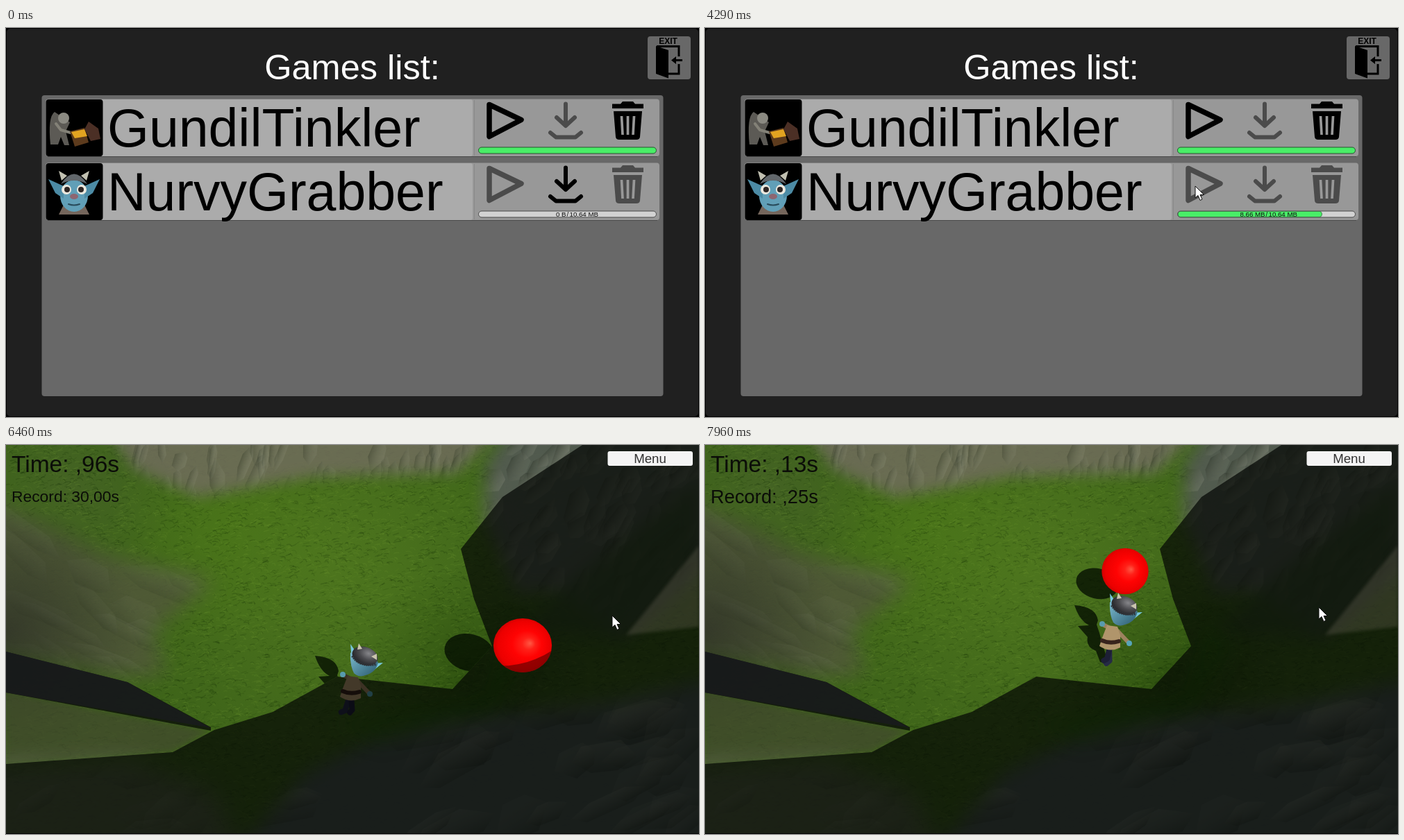
Animation, 998 px wide and 561 px high, one loop 8 s. Source, as an HTML page with a canvas:

```html
<!DOCTYPE html>
<html lang="en">
<head>
<meta charset="utf-8">
<title>Games list</title>
<style>
  html, body { margin: 0; width: 100%; height: 100%; overflow: hidden; background: #000; }
  canvas, svg { position: absolute; left: 0; top: 0; width: 998px; height: 561px; }
  text { font-family: "Liberation Sans", Arial, sans-serif; white-space: pre; }
  .line { fill: none; stroke: #000; stroke-linecap: round; stroke-linejoin: round; }
  .name { font-size: 77px; }
  .bytes { font-size: 9.7px; fill: #111; }
  .hud { fill: #0b0d08; }
</style>
</head>
<body>
<canvas id="ground" width="998" height="561"></canvas>
<svg viewBox="0 0 998 561">
  <defs>
    <g id="row">
      <rect x="57" y="102.500" width="884" height="82.500" rx="4" fill="#989898"/>
      <path d="M138 103H669Q672 103 672 106V182Q672 185 669 185H138Z" fill="#ababab"/>
      <path d="M674.500 104V184" stroke="#888"/>
      <path d="M60 185.500H938" stroke="#4a4a4a"/>
      <rect x="57.500" y="103" width="82" height="82" rx="4"/>
    </g>
    <path id="play" class="line" stroke-width="7.500" d="M696 110.500 742 132.500 696 156.500Z"/>
    <path id="load" class="line" stroke-width="6" d="M806 109.500V139M793 129 806 141 819 129M784 151 792 157.500H820L828 151"/>
    <g id="trash">
      <path d="M873 109.500H885L888 106H903L906 109.500H918V116H873ZM875 120H916L913 157Q912.500 161 908 161H883Q878.500 161 878 157Z"/>
      <path d="M886.500 127 888 154M895.500 127V154M904.500 127 903 154" stroke="#989898" stroke-width="3.700"/>
    </g>
    <rect id="bar" x="680.500" y="172" width="256" height="9" rx="4.500"/>
    <clipPath id="track"><use href="#bar"/></clipPath>
    <clipPath id="lit"><path id="litPath"/></clipPath>
    <clipPath id="ballClip"><ellipse id="ballEdge"/></clipPath>
    <radialGradient id="red" r=".56" fx=".63" fy=".46">
      <stop offset="0" stop-color="#ff5844"/><stop offset=".2" stop-color="#ff2018"/>
      <stop offset=".45" stop-color="#ff0303"/><stop offset=".8" stop-color="#ec0000"/><stop offset="1" stop-color="#bc0000"/>
    </radialGradient>
    <linearGradient id="skin" x2="1" y2="1">
      <stop offset="0" stop-color="#7fc0d4"/><stop offset="1" stop-color="#28566b"/>
    </linearGradient>
    <radialGradient id="iron" cx=".6" cy=".3" r=".7">
      <stop offset="0" stop-color="#86868a"/><stop offset=".5" stop-color="#4b4b4f"/><stop offset="1" stop-color="#232327"/>
    </radialGradient>
    <g id="halfImp">
      <path d="M-37-20-15-10-15 8-27 0Z" fill="#4c8ba5"/>
      <path d="M-18-18-22-32-10-25Z" fill="#c1c0b1"/>
      <circle cx="-11" cy="-5" r="7" fill="#ece9df"/>
      <circle cx="-10" cy="-5" r="4" fill="#2d2625"/>
    </g>
  </defs>

  <g id="menu">
    <rect width="998" height="561"/>
    <rect x="1" y="1" width="996" height="559" rx="5" fill="#202020"/>
    <text x="498.500" y="73.500" font-size="50.500" text-anchor="middle" fill="#fff">Games list:</text>
    <rect x="924" y="12" width="62" height="62" rx="4" fill="#686868"/>
    <text x="953.500" y="22.500" font-size="12" font-weight="bold" text-anchor="middle">EXIT</text>
    <path d="M936 26 954 32V72.500L936 66ZM958 46.500 965 41V52Z"/>
    <path d="M937 26.500H969V41M969 52V66H954M974 46.500H961" fill="none" stroke="#000" stroke-width="3"/>
    <rect x="51.500" y="97" width="895" height="434" rx="4" fill="#686868"/>

    <use href="#row"/>
    <path d="M70 121Q60 128 64 168H75L79 157 84 169H91L86 149 92 136Z" fill="#5c5a55"/>
    <circle cx="83" cy="130" r="8" fill="#8b8a82"/>
    <path d="M72 138 79 147 93 151" class="line" style="stroke:#838177" stroke-width="4"/>
    <path d="M92 149 113 144 119 165 99 171Z" fill="#5d3b1d"/>
    <path d="M94 150 113 146 117 156 99 159Z" fill="#e2a321"/>
    <path d="M113 146 119 135 133 145 136 160 122 163Z" fill="#4b2f25"/>
    <text class="name" x="146" y="170.500">GundilTinkler</text>
    <use href="#play"/><use href="#load" opacity=".5"/><use href="#trash"/>
    <use href="#bar" fill="#49ee67" stroke="#24532d"/>

    <use href="#row" y="92"/>
    <g transform="translate(98 238)">
      <path d="M-22 31-14 15H14L22 31Z" fill="#75665c"/>
      <ellipse cy="4" rx="20" ry="23" fill="#619fb7"/>
      <path d="M-19-13Q0-42 19-13 0-23-19-13Z" fill="#62676b"/>
      <use href="#halfImp"/><use href="#halfImp" transform="scale(-1 1)"/>
      <ellipse cy="5" rx="6" ry="4" fill="#8d6671"/>
      <path d="M-8 16Q0 19 8 16" class="line" style="stroke:#294b5b" stroke-width="2"/>
    </g>
    <text class="name" x="146" y="263">NurvyGrabber</text>
    <g transform="translate(0 92)">
      <use id="play2" href="#play"/><use id="load2" href="#load"/><use id="trash2" href="#trash"/>
      <use href="#bar" fill="#d2d2d2"/>
      <g clip-path="url(#track)"><rect id="fill" x="681" y="172" height="9" rx="4.500" fill="#49ee67" stroke="#24532d" stroke-width=".7"/></g>
      <use href="#bar" fill="none" stroke="#494949"/>
      <g id="bytes" class="bytes">
        <text id="got" x="806.500" y="179.700" text-anchor="end"></text>
        <text x="808.800" y="179.700" text-anchor="middle">/</text>
        <text x="811.500" y="179.700">10.64 MB</text>
      </g>
    </g>
  </g>

  <g id="game">
    <g clip-path="url(#lit)" fill="#030c00" fill-opacity=".77">
      <ellipse id="ballShade"/>
      <path id="idleShade" d="M435 320 446 322 451 315 475 317 477 340 462 342 444 331Z"/>
      <path id="runShade" d="M-71 0Q-40 2-37 22L-39 28-35 40-30 58-22 84-34 82-40 66Q-55 60-52 46L-66 30-50 29Q-64 22-71 0Z"/>
    </g>
    <ellipse id="ball" fill="url(#red)"/>
    <g clip-path="url(#ballClip)"><path id="ballDark" fill="#500" d="M-60 28Q10 38 60-6V60H-60Z"/></g>

    <g id="idle">
      <ellipse cx="484" cy="388" rx="8" ry="10" fill="#17172b"/>
      <ellipse cx="503" cy="390" rx="8" ry="10" fill="#17172b"/>
      <path d="M482 360 477 374M512 360 518 375" class="line" style="stroke:#363c3d" stroke-width="5"/>
      <path d="M487 348H509L517 368 513 382Q498 387 482 381L478 366Z" fill="#3c3023"/>
      <path d="M481 371Q498 376 515 370" class="line" style="stroke:#24100d" stroke-width="5"/>
      <path d="M472 320 486 326 485 339 477 335ZM537 324 522 326 522 340 530 335Z" fill="#8ed5df"/>
      <ellipse cx="504" cy="335" rx="21" ry="15" fill="#639cac"/>
      <ellipse cx="505" cy="330" rx="21" ry="15" fill="url(#iron)"/>
      <path d="M484 334Q505 356 526 333" fill="none" stroke="#4b5055" stroke-width="4" stroke-dasharray="2 1"/>
      <path d="M488 327 486 318 495 325ZM518 325 522 317 525 328Z" fill="#c0baa2"/>
    </g>

    <g id="run">
      <g id="body">
        <path id="legA" class="line" style="stroke:#22263f" stroke-width="8" d="M-21 58-24 80-29 83"/>
        <path id="legB" class="line" style="stroke:#1a1c31" stroke-width="8" d="M-19 58-21 78-25 81"/>
        <path d="M-22 32-32 27M-10 36 7 54" class="line" style="stroke:#8f7656" stroke-width="6"/>
        <path d="M-24 29-9 31-5 43-5 61Q-20 69-35 59L-31 47Z" fill="#a08761"/>
        <path d="M-31 51Q-20 56-7 52" class="line" style="stroke:#322019" stroke-width="6"/>
        <circle cx="8" cy="55" r="4" fill="#4f95a7"/>
      </g>
      <circle cx="-31" cy="27" r="4" fill="#589bad"/>
      <path d="M-20-17-13-7-18 7ZM27 10 12 11 12 22Z" fill="#77c7dc"/>
      <path d="M-20-4Q-16-10 0-6L20 9Q17 24 2 28-8 32-15 25-21 13-20-4Z" fill="url(#skin)"/>
      <ellipse cx="1" rx="19" ry="13" transform="rotate(20)" fill="url(#iron)"/>
      <path d="M-17 0Q-8 16 17 12" fill="none" stroke="#303338" stroke-width="4" stroke-dasharray="2 1"/>
      <path d="M-10-9-8-18-3-10ZM10 1 18-3 18 6Z" fill="#c9c4ae"/>
    </g>

    <text id="time" class="hud" x="8"></text>
    <text id="record" class="hud" x="8"></text>
    <rect x="866.500" y="9" width="122.500" height="21" rx="3" fill="#f4f4f4"/>
    <text x="927.500" y="26" font-size="18.700" text-anchor="middle" fill="#323232">Menu</text>
    <path d="M0 560.500H998" stroke="#050505"/>
  </g>
  <path id="cursor" d="M0 0V17L4 13.500 7 20.500 10 19 7 12.500H12.500Z" fill="#fff" stroke="#111"/>
</svg>

<script>
const W = 998, H = 561, LOOP = 8000, STEP = 1000 / 24, GAME = 5540, TOTAL = 10.64;
const $ = id => document.getElementById(id);
const LIT = 'M0 0H830L715 75 655 150 674 222 700 290 643 352 477 334 384 385 300 411 240 443 0 460V357L295 412 295 407 175 342 0 298Z';
$('litPath').setAttribute('d', LIT);

// ---- terrain, painted once ----
const g = $('ground').getContext('2d');
let seed = 7;
const rnd = (a = 0, b = 1) => {
  seed = (seed * 16807) % 2147483647;
  return a + (b - a) * seed / 2147483647;
};

function soft(d, fill, blur = 0, c = g) {
  c.save();
  c.filter = blur ? `blur(${blur}px)` : 'none';
  c.fillStyle = fill;
  c.fill(new Path2D(d), 'evenodd');
  c.restore();
}

function glow(x, y, r, rgb, a) {
  const c = g.createRadialGradient(x, y, 0, x, y, r);
  c.addColorStop(0, `rgba(${rgb},${a})`);
  c.addColorStop(1, `rgba(${rgb},0)`);
  g.fillStyle = c;
  g.fillRect(0, 0, W, H);
}

function grass(n) {
  for (let i = 0; i < n; i++) {
    const x = rnd(0, W), y = rnd(0, H), a = rnd(-.9, .9), l = rnd(4, 10);
    g.strokeStyle = rnd() < .5 ? 'rgba(130,170,60,.15)' : 'rgba(15,42,4,.2)';
    g.lineWidth = rnd(.6, 1.5);
    g.beginPath();
    g.moveTo(x, y);
    g.quadraticCurveTo(x + l * .7, y - 2, x + l * Math.cos(a), y + l * Math.sin(a) * .7);
    g.stroke();
  }
}

// A soft-edged area covered with slabs, each lit on one side
function rock(d, color, alpha, blur, angle, len, wide, relief) {
  const layer = document.createElement('canvas');
  layer.width = W;
  layer.height = H;
  const c = layer.getContext('2d');
  c.fillStyle = color;
  c.fillRect(0, 0, W, H);
  for (let n = 1.6 * W * H / (len * wide); n > 0; n--) {
    c.save();
    c.translate(rnd(0, W), rnd(0, H));
    c.rotate(angle + rnd(-.3, .3));
    const l = len * rnd(.5, 1.1) / 2, w = wide * rnd(.5, 1.2) / 2;
    const shade = c.createLinearGradient(0, -w, 0, w);
    shade.addColorStop(0, `rgba(205,203,190,${relief * rnd(.3, 1)})`);
    shade.addColorStop(1, `rgba(12,14,12,${relief * 1.3})`);
    c.fillStyle = shade;
    c.beginPath();
    for (let k = 0; k < 6; k++) {
      const a = k * Math.PI / 3 + rnd(-.3, .3);
      c.lineTo(l * Math.cos(a), w * Math.sin(a));
    }
    c.fill();
    c.restore();
  }
  c.globalCompositeOperation = 'destination-in';
  soft(d, '#000', blur, c);
  g.globalAlpha = alpha;
  g.drawImage(layer, 0, 0);
  g.globalAlpha = 1;
}

function paintGround() {
  g.fillStyle = '#3d6319';
  g.fillRect(0, 0, W, H);
  glow(470, 170, 330, '86,127,32', .65);
  glow(310, 120, 170, '80,128,22', .4);
  glow(90, 60, 160, '72,98,42', .6);
  glow(670, 340, 170, '20,50,0', .4);
  grass(17000);

  rock('M140-30 185 35 275 75 440 46 650 40 720-30Z', 'rgb(112,108,92)', .85, 10, 1.75, 60, 20, .2);
  rock('M-40 70 130 155 300 195 210 270 230 330 170 335-40 290Z', 'rgb(82,86,60)', .8, 15, .6, 150, 40, .1);
  glow(0, 270, 190, '42,44,36', .7);
  rock('M690 30 730-30H1030V150L890 275 790 212 735 215 690 110Z', 'rgb(84,90,84)', .9, 12, 2.2, 70, 30, .2);
  soft('M735 270 810 200 998 50V170L890 280Z', 'rgba(50,74,36,.75)', 12);
  soft('M0 357 295 412 240 443 0 460Z', 'rgba(66,72,46,.72)', 4);
  rock('M330 590 430 475 540 420 640 395 860 372 1030 335V590Z', 'rgb(80,89,92)', .93, 14, -.4, 130, 55, .2);
  rock('M-30 462 180 455 300 500 340 590H-30Z', 'rgb(95,99,82)', .75, 18, -.4, 110, 45, .12);

  // Everything outside the sunlit patch is shaded
  soft(LIT + 'M0 0H998V561H0Z', 'rgba(3,7,3,.71)');
  soft('M0 298 175 342 295 408 0 357Z', 'rgba(25,27,31,.8)');
  soft('M998 145 893 274 998 262Z', 'rgba(130,126,108,.25)', 2);
  soft('M470 400 690 360 720 250 760 290 700 385 540 430Z', 'rgba(12,40,0,.32)', 14);
}
paintGround();

// ---- motion ----
const ramp = (t, a, b) => Math.min(1, Math.max(0, (t - a) / (b - a)));
const smooth = u => u * u * (3 - 2 * u);

// Adds up eased moves, each [begin, end, ...change]
const drift = (t, start, moves) => moves.reduce((p, [a, b, ...d]) => {
  const u = smooth(ramp(t, a, b));
  return p.map((v, i) => v + d[i] * u);
}, start);

const cursorAt = t => drift(t, [921, 363], [
  [160, 780, -118, -141],
  [1080, 1720, -97, 6],
  [5540, 5920, -18, 5],
  [5920, 6400, 185, 13],
  [6460, 7960, 11, -12]
]);

// x, y and height over the grass; each catch makes it jump
const ballAt = t => drift(t, [575, 194, 0], [
  [5540, 5920, 8, 7, 0],
  [5920, 6460, 161, 88, .8],
  [6460, 7420, -65, -5, .2],
  [7579, 7580, -61, -69, -.8],
  [7829, 7830, -13, -33, -.1]
]);

const set = (el, attrs) => { for (const k in attrs) $(el).setAttribute(k, attrs[k]); };
const show = (el, on) => set(el, { display: on ? 'inline' : 'none' });
const move = (el, x, y) => set(el, { transform: `translate(${x} ${y})` });

const pen = document.createElement('canvas').getContext('2d');
pen.font = '100px "Liberation Sans", Arial, sans-serif';

// The label picks the font size that fills its box
function label(el, text, mid) {
  if ($(el).textContent === text) return;
  const size = 155 / pen.measureText(text).width * 100;
  $(el).textContent = text;
  set(el, { 'font-size': size, y: mid + size * .3465 });
}

const seconds = ms => (ms / 1000).toFixed(2).replace(/^0/, '').replace('.', ',') + 's';
const bytes = mb => mb === 0 ? '0 B' : mb < 1 ? (mb * 1024).toFixed(2) + ' KB' : mb.toFixed(2) + ' MB';

function drawMenu(t) {
  const done = t >= 4540;
  const mb = Math.max(0, t - 1090) * .002705;
  const part = t >= 5160 ? 0 : done ? 1 : mb / TOTAL;
  const ready = .5 + .5 * (ramp(t, 4500, 4710) - ramp(t, 5125, 5333));
  set('load2', { opacity: 1 - .5 * ramp(t, 750, 960) });
  set('play2', { opacity: ready });
  set('trash2', { opacity: ready });
  set('fill', { width: 255 * part });
  show('fill', part > 0);
  show('bytes', !done);
  $('got').textContent = bytes(mb);
}

function drawBall(t) {
  const [cx, cy, h] = ballAt(t);
  const shape = { cx, cy, rx: 32.5 + 12 * h, ry: 32.5 + 8 * h };
  const sx = cx - 35 - 52 * h, sy = cy + 19 - 11 * h;
  set('ball', shape);
  set('ballEdge', shape);
  set('ballShade', { cx: sx, cy: sy, rx: 30 + 8 * h, ry: 21 + 7 * h, transform: `rotate(14 ${sx} ${sy})` });
  move('ballDark', cx, cy);
  set('ballDark', { opacity: ramp(cx, 690, 780) });
}

function drawHero(t) {
  const running = t >= 6340;
  for (const el of ['idle', 'idleShade']) show(el, !running);
  for (const el of ['run', 'runShade']) show(el, running);
  const u = ramp(t, 6460, 7960);
  const x = 516 + 87 * u, y = 304 - 73 * u ** 1.3;
  move('run', x, y);
  move('runShade', x, y);
  $('body').style.filter = `brightness(${Math.min(1.1, .42 + .9 * u)})`;
  const swing = 16 * Math.sin((t - 7420) / 95);
  set('legA', { transform: `rotate(${swing} -21 58)` });
  set('legB', { transform: `rotate(${-swing} -19 58)` });
}

function drawGame(t) {
  const start = t >= 7830 ? 7830 : t >= 7580 ? 7580 : 5500;
  const best = t >= 7830 ? ',25s' : t >= 7580 ? '2,08s' : t >= 6170 ? '30,00s' : '0s';
  label('time', 'Time: ' + seconds(t - start), 27.5);
  label('record', 'Record: ' + best, 74.3);
  drawBall(t);
  drawHero(t);
}

function draw(now) {
  const step = Math.floor((now % LOOP + 5) / STEP) % 192;
  const t = Math.round(step * STEP / 10) * 10;
  const playing = t >= GAME;
  show('menu', !playing);
  show('game', playing);
  show('cursor', t >= 170);
  move('cursor', ...cursorAt(t));
  if (playing) drawGame(t); else drawMenu(t);
}

const origin = performance.now();
function tick() {
  draw(performance.now() - origin);
  requestAnimationFrame(tick);
}
tick();
</script>
</body>
</html>
```
